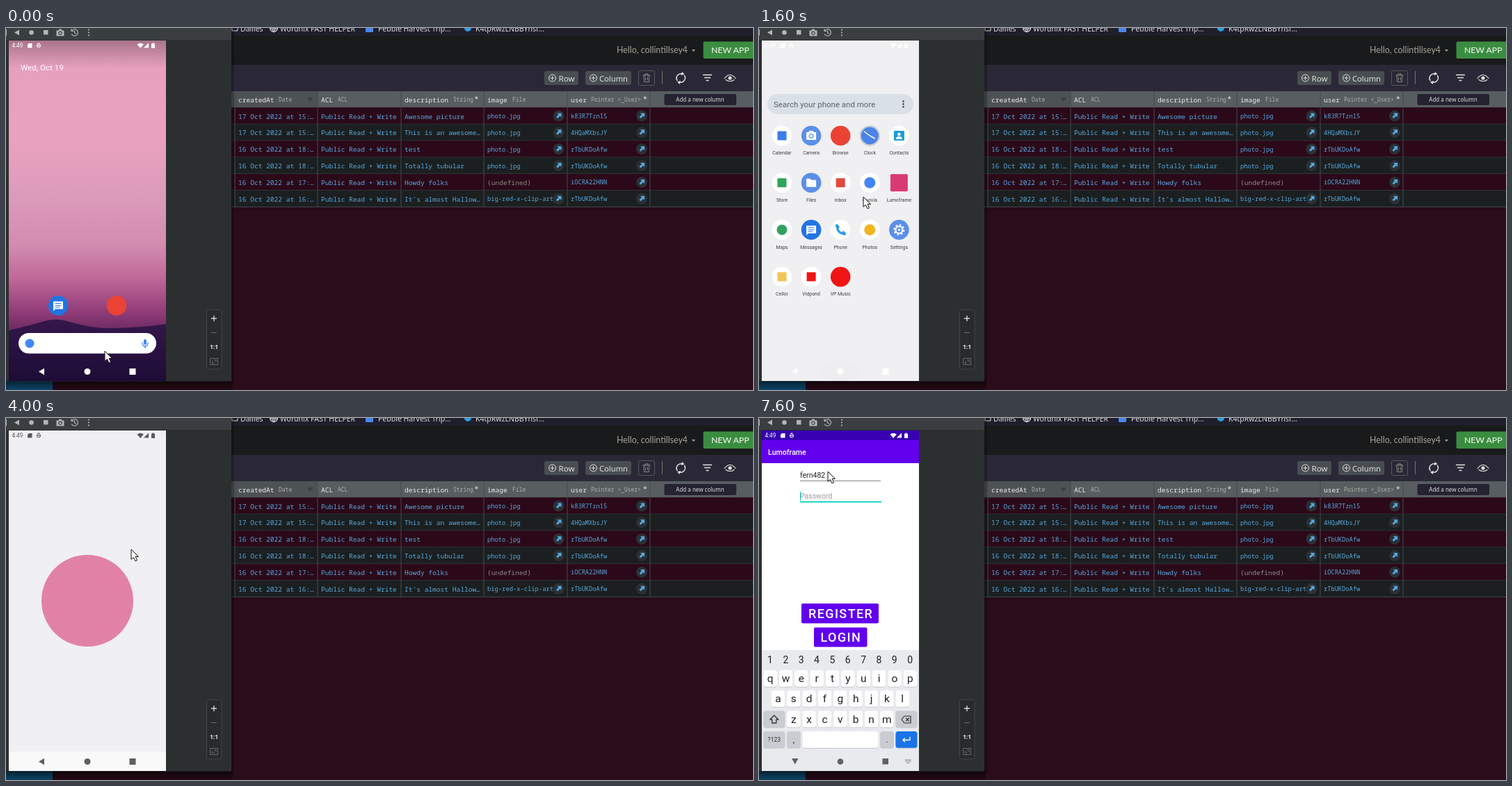
These frames come from a looping animation (1074x521 px, 8 s). An HTML page:

```html
<!DOCTYPE html>
<html lang="en">
<head>
<meta charset="utf-8">
<title>Phone emulator beside a data browser</title>
<style>
html, body { margin: 0; width: 100%; height: 100%; overflow: hidden; background: #2a0c1a; }
svg { display: block; width: 1074px; height: 521px; }
text { white-space: pre; }
.ui { font-family: "Noto Sans", "Open Sans", sans-serif; }
.lato { font-family: Lato, sans-serif; }
.mono { font-family: "Noto Sans Mono", "DejaVu Sans Mono", monospace; }
.rob { font-family: Roboto, "Noto Sans", sans-serif; }
.mid { text-anchor: middle; }
.med { font-weight: 500; }
.line { fill: none; stroke-linecap: round; stroke-linejoin: round; }
</style>
</head>
<body>
<svg id="stage" viewBox="0 0 1074 521" xmlns="http://www.w3.org/2000/svg"></svg>
<script>
const LOOP = 8000;

// ---- drawing helpers ----
const text = (x, y, s, size, fill, cls = 'rob', more = '') =>
  `<text x="${x}" y="${y}" font-size="${size}" fill="${fill}" class="${cls}" ${more}>${s}</text>`;
const box = (x, y, w, h, fill, r = 0, more = '') =>
  `<rect x="${x}" y="${y}" width="${w}" height="${h}" rx="${r}" fill="${fill}" ${more}/>`;
const dot = (x, y, r, fill, more = '') => `<circle cx="${x}" cy="${y}" r="${r}" fill="${fill}" ${more}/>`;
const shape = (d, fill, more = '') => `<path d="${d}" fill="${fill}" ${more}/>`;
const line = (d, stroke, w = 1) => `<path class="line" d="${d}" stroke="${stroke}" stroke-width="${w}"/>`;
const group = (id, body) => `<g id="${id}">${body}</g>`;
const at = (x, y, body) => `<g transform="translate(${x} ${y})">${body}</g>`;
const dots = (x, y, gap, r, fill, across) =>
  [-1, 0, 1].map(i => across ? dot(x + i * gap, y, r, fill) : dot(x, y + i * gap, r, fill)).join('');
const mic = (x, y, fill) => at(x, y,
  box(-2, -6, 4, 8, fill, 2) + line('M-4 -1Q-4 4 0 4T4 -1M0 4V6.5', fill, 1.3));
const gear = (x, y, r, stroke, w) => at(x, y,
  dot(0, 0, r, 'none', `stroke="${stroke}" stroke-width="${w}"`) +
  dot(0, 0, r + w, 'none', `stroke="${stroke}" stroke-width="${w}" stroke-dasharray="${(r + w) * Math.PI / 8}"`) +
  dot(0, 0, r * .35, stroke));

// ---- data browser ----
const BLUE = '#57a9de', PALE = '#e4e2df';
const cols = [329, 448, 568, 687, 807, 926];
const heads = [['createdAt', 'Date', 392], ['ACL', 'ACL', 477], ['description', 'String', 643],
  ['image', 'File', 728], ['user', 'Pointer &lt;_User&gt;', 841]];
const rows = [
  ['17 Oct 2022 at 15:…', 'Awesome picture', 'photo.jpg', 'k83R7Tzn15'],
  ['17 Oct 2022 at 15:…', 'This is an awesome…', 'photo.jpg', '4HQaMXbsJY'],
  ['16 Oct 2022 at 18:…', 'test', 'photo.jpg', 'rTbUKDoAfw'],
  ['16 Oct 2022 at 18:…', 'Totally tubular', 'photo.jpg', 'rTbUKDoAfw'],
  ['16 Oct 2022 at 17:…', 'Howdy folks', '', 'iOCRA22HNN'],
  ['16 Oct 2022 at 16:…', "It's almost Hallow…", 'big-red-x-clip-art', 'rTbUKDoAfw']];

const link = (x, y) => dot(x, y, 8, '#2b3036') + shape(`M${x - 2} ${y - 4}h6v6l-2-2l-3.5 3.5l-2-2l3.5-3.5z`, BLUE);
const plus = (x, y) => dot(x, y, 5, 'none', `stroke="${PALE}"`) + line(`M${x - 2.5} ${y}h5M${x} ${y - 2.5}v5`, PALE);

function browser() {
  let s = box(0, 0, 1074, 521, '#2a0c1a') + box(0, 0, 1074, 11, '#1f1e2b') + box(0, 11, 1074, 42, '#191a1b') +
    box(0, 53, 1074, 38, '#2a2836') + box(0, 508, 67, 13, '#0d5078');
  const mark = (x, label) => text(x, 4.8, label, 10.5, '#dcdbe0', 'ui');
  s += line('M325 -2V4H333V-2', '#dcdbe0') + mark(337, 'Dailies') +
    dot(385, 0, 5.5, 'none', 'stroke="#e6e6ea" stroke-width="1.2"') + line('M380 1h10M385 -5v11M383 -4q-2 5 1 9M387 -4q2 5 -1 9', '#e6e6ea', .9) +
    mark(394, 'Wordnix FAST HELPER') + box(517, -5, 11, 11, '#4a86f0', 1) + mark(535, 'Pebble Harvest Trip…') +
    dot(664, 0, 5, '#2a9fe8') + mark(675, 'K4tpRwzLNBBYhsf…');

  s += text(980, 36, 'Hello, collintillsey4', 12.4, '#a9a39a', 'lato', 'text-anchor="end"') + shape('M986 31h5l-2.5 3z', '#a9a39a') +
    box(1002.5, 19.5, 76, 24.5, '#3a8d40', 2) + text(1014, 36, 'NEW APP', 12.2, '#f0f3ee', 'lato med');

  s += box(774, 62, 49, 20, '#484d51', 3) + plus(785.5, 72) + text(794.5, 76.5, 'Row', 11.6, PALE, 'ui') +
    box(833, 62, 66, 20, '#484d51', 3) + plus(844.5, 72) + text(853, 76.5, 'Column', 11.2, PALE, 'ui') +
    box(909.5, 61.5, 23, 21, 'none', 2, 'stroke="#53585c"') +
    line('M916 68h10M919 68v-2h4v2M917 68l.6 9.5h6.8l.6-9.5M919.5 71v4M922.5 71v4', '#8b8986') + box(943, 62, 1, 19, '#77746f') +
    line('M965 75.5a6.3 6.3 0 0 1 8-9M975.5 68.500a6.3 6.3 0 0 1-8 9', PALE, 1.5) +
    shape('M972 63l3.5 3.5l-5 1.500zM968.5 81l-3.500-3.5l5-1.5z', PALE) +
    line('M1002.5 67.5h12M1004.5 71.5h8M1007 75.5h3', PALE, 1.4) +
    line('M1033 72.500q8-10 16 0M1035 74.500q6 4.500 12 0', PALE, 1.2) + dot(1041, 72, 2.6, PALE);

  s += box(324, 91, 750, 23.5, '#575d60') + box(324, 91, 124, 23.5, '#4d5255');
  heads.forEach(([name, type, x], i) => {
    s += text(cols[i] + 5, 106.5, name, 9.55, '#eeece8', 'mono') + text(x, 106, type, 8, '#b3b0aa', 'mono');
  });
  s += text(673, 106, '*', 11, '#eeece8', 'mono') + text(915.5, 106, '*', 11, '#eeece8', 'mono') + shape('M433 100h9l-4.5 6z', '#3b4043') +
    box(946.5, 95, 103.5, 16, '#252231', 2) + text(998, 106, 'Add a new column', 8, '#e0dedb', 'ui mid');

  rows.forEach(([date, about, file, user], i) => {
    const y = 114.5 + i * 23.85, mid = y + 12, base = y + 16;
    s += box(324, y, 750, 23.85, i % 2 ? '#1b1f20' : '#2b0919') + box(324, y + 23.3, 750, 1, '#40474a') +
      text(334, base, date, 9.55, BLUE, 'mono') + text(453, base, 'Public Read + Write', 9.55, BLUE, 'mono') +
      text(573, base, about, 9.55, BLUE, 'mono') +
      (file ? text(692, base - .5, file, 8.8, BLUE, 'mono') + link(794.5, mid) : text(692, base, '(undefined)', 9.55, '#8e8a84', 'mono')) +
      text(812, base - .5, user, 8.7, BLUE, 'mono') + link(914, mid);
  });
  return s + cols.map(x => box(x - .5, 91, 1, 167, '#454c4f')).join('');
}

// ---- emulator window ----
function frame() {
  const c = '#b3b6b8';
  return box(324, 0, 4, 510, '#000', 0, 'opacity=".25"') + box(0, 508, 326, 13, 'url(#shadow)') +
    box(0, 0, 324, 508.5, '#2c2f30') + box(0, 0, 324, 17, '#3a3e40') +
    box(0, 2, 1, 9, c) + shape('M12 6.5l7-4v8z', c) + dot(36.5, 6.5, 3.3, c) + box(54, 3, 6.5, 6.5, c) +
    shape('M72.5 3.5h3l1-2h3l1 2h3v8h-11z', c) + dot(78, 7.3, 2.2, 'none', 'stroke="#3a3e40" stroke-width="1.1"') +
    line('M94.5 4a4.8 4.8 0 1 1 0 5M94 1.5v3h3M98.5 4v3l2 1', c, 1.2) + dots(119, 6.5, 4, 1.1, c) +
    box(288.5, 405.5, 21.5, 85.5, '#282a2b', 3, 'stroke="#414446"') + line('M295.5 418h7M299 414.5v7', '#d5d7d8', 1.4) +
    line('M295.5 438.5h7', '#6c6f71') + text(299, 462, '1:1', 8.5, '#e3e4e5', 'ui mid', 'font-weight="700"') +
    line('M294 475.5h10.5v9h-10.5zM296.5 482v-2.5M296.5 482h2.5M302 478v2.5M302 478h-2.5', '#66696b');
}

// ---- launcher ----
const disc = (x, y, fill) => dot(x, y, 14.3, fill);
const bubble = shape('M-7 -6H7V5H-4L-7 8Z', '#fff') + line('M-4 -3H4M-4 0H4M-4 2.5H2', '#2a72e0', 1);
const badge = color => box(-6.5, -6.5, 13, 13, color, 1);
const BG = '#5b90e8';

const home = () =>
  text(21, 60.5, 'Wed, Oct 19', 11.6, '#fff') + disc(75, 399.5, '#2174e3') + at(75, 399.5, bubble) +
  disc(159, 399.5, '#ea4335') + box(18, 439, 198, 29.5, '#fff', 14.75) + dot(34, 454, 6.5, '#4285f4') + mic(200, 454, '#4285f4');

// label, disc colour, pictogram
const apps = [
  ['Calendar', '#fff', badge('#3b7de8')],
  ['Camera', BG, shape('M-7 -5h3l1.5-2h5l1.5 2h3v11h-14z', '#fff') + dot(0, .5, 3.5, BG) + dot(0, .5, 2.2, '#fff')],
  ['Browse', '#ea4335', ''],
  ['Clock', '#4b83e6', dot(0, 0, 13.5, 'none', 'stroke="#c9cdd3" stroke-width="2"') + line('M-8 -6L0 0L7 4', '#fff', 1.5)],
  ['Contacts', '#fff', box(-7.5, -7, 15, 14, '#1c9ad8', 1) + dot(0, -2, 2.3, '#fff') + shape('M-4.5 5q0-4 4.5-4t4.5 4z', '#fff')],
  ['Store', '#fff', badge('#2fa35a')],
  ['Files', BG, shape('M-7 -6h5l2 2h7v10h-14z', '#fff')],
  ['Inbox', '#fff', badge('#e14a3c')],
  ['Quovia', '#fff', dot(0, 0, 8, '#4285f4')],
  ['Lumoframe', '#fff', box(-12.5, -12.5, 25, 25, '#d83a72', 2)],
  ['Maps', '#fff', dot(0, 0, 7.5, '#34a060')],
  ['Messages', '#2174e3', bubble],
  ['Phone', '#fff', line('M-5 -6Q-5 5 6 6', '#2a9be6', 3) + line('M-5.5 -6l2 2M4 4l2 2', '#2a9be6', 4)],
  ['Photos', '#fff', dot(0, 0, 8, '#f2b51f')],
  ['Settings', BG, gear(0, 0, 5, '#fff', 2)],
  ['Cellor', '#fff', badge('#f1c35a')],
  ['Vidpond', '#fff', badge('#f01414')],
  ['VP Music', '#f01414', '']];

const drawer = () =>
  box(12, 45, 210, 29, '#dae1e6', 14.5) + text(21, 63.8, 'Search your phone and more', 11.5, '#59636b') + dots(207.5, 59.5, 4, 1.2, '#333') +
  apps.map(([label, fill, icon], i) => {
    const x = 33 + i % 5 * 42.1, y = 105 + Math.floor(i / 5) * 67.7;
    return disc(x, y, fill) + at(x, y, icon) + text(x, y + 27.3, label, 6.9, '#3c3f43', 'rob mid');
  }).join('');

// ---- login screen ----
const app = () =>
  box(4, 18, 226, 490, '#fff') + box(4, 18, 226, 14.5, '#3700b3') + box(4, 32, 226, 33, '#6200ee') + box(4, 480, 226, 28, '#000') +
  text(13, 52.7, 'Lumoframe', 10.6, '#fff', 'rob med') +
  text(59, 86, 'Username', 10.4, '#9b9b9b', 'rob', 'id="hint"') +
  `<text x="59" y="86" font-size="10.5" class="rob">${[...'fern482'].map((c, i) => `<tspan id="c${i}">${c}</tspan>`).join('')}</text>` +
  box(59, 90, 116, 1, '#868686') + group('focus1', box(59, 89.7, 116, 1.4, '#17d3c6')) +
  text(59, 116.3, 'Password', 10.5, '#9b9b9b') + box(59, 120, 117, 1, '#868686') +
  group('focus2', box(59, 119.7, 117, 2, '#17d3c6') + box(59, 105.5, 1, 13.5, '#17d3c6')) +
  box(61, 267, 111, 28.5, '#6200ee', 2) + text(71, 287.6, 'REGISTER', 18, '#fff', 'rob med', 'letter-spacing="1.4"') +
  box(79, 301.5, 76.5, 28, '#6200ee', 2) + text(88.5, 322.3, 'LOGIN', 18, '#fff', 'rob med', 'letter-spacing="1.4"');

const key = (x, y, w, fill = '#fff') => box(x - w / 2, y - 11.8, w, 24.6, '#c8cacf', 3.5) + box(x - w / 2, y - 12, w, 23.8, fill, 3.5);
const STEP = 22.35;
const letters = (chars, x, y) => [...chars].map((c, i) =>
  key(x + i * STEP, y, 19.6) + text(x + i * STEP, y + 5, c, 15.5, '#202124', 'rob mid')).join('');

function keyboard() {
  const ink = '#505357', gray = '#c9ccd3';
  const digits = [...'1234567890'];
  const tools = line('M19.5 345l-3 3l3 3', ink, 1.3) +
    line('M44 343.5h8.5v6l-3 3h-5.5zM46 348.5q2 2.5 4.5 0', ink, 1.2) + text(80, 351, 'GIF', 8, ink, 'rob mid', 'font-weight="700"') +
    line('M109 344h8v9h-8zM111.5 344v-1.5h3v1.5M111 347.5h4M111 350h4', ink, 1.2) + gear(145.5, 348, 2.9, ink, 1.5) +
    box(166, 342, 1, 12, '#d3d6da') + dots(186, 348, 3.8, 1, ink, true);
  const words = line('M17.5 345l3 3l-3 3', ink, 1.3) +
    ['ferns', 'fern', 'fernery'].map((w, i) => text(62 + i * 53, 351.5, w, 9.5, ink, 'rob mid')).join('') +
    box(88, 342, 1, 12, '#d3d6da') + box(140, 342, 1, 12, '#d3d6da');
  return box(4, 334, 226, 176, '#e8eaee') +
    group('bar', dot(18.5, 348, 8, '#fff') + mic(218, 348, ink) + group('tools', tools) + group('words', words)) +
    group('nums', digits.map((d, i) => text(16 + i * STEP, 353.3, d, 14, '#202124', 'rob mid')).join('')) +
    letters('qwertyuiop', 16.2, 375) + letters('asdfghjkl', 27.4, 404) + letters('zxcvbnm', 49.8, 433.5) +
    group('sups', digits.map((d, i) => text(22.7 + i * STEP, 369.5, d, 5, ink, 'rob mid')).join('')) +
    key(21.8, 433.5, 31, gray) + line('M21.8 428l-6 6h3v5h6v-5h3z', '#333', 1.3) +
    key(212, 433.5, 31, gray) + line('M205 434l4-5h9v10h-9zM211.5 432l4 4M215.5 432l-4 4', '#333', 1.2) +
    key(21.8, 463, 31, gray) + text(21.8, 466, '?123', 8.5, '#333', 'rob mid') +
    key(50, 463, 19.6, gray) + text(50, 467, ',', 13, '#333', 'rob mid') +
    key(72, 463, 19.6) + dot(72, 463, 5.5, 'none', 'stroke="#333" stroke-width="1.2"') + dot(70, 461.5, .9, '#333') + dot(74, 461.5, .9, '#333') +
    line('M69 464.5q3 3.5 6 0', '#333', 1.1) + key(128, 463, 87) +
    group('wide', box(61, 450, 23, 26, '#e8eaee') + key(117, 463, 109)) +
    key(184, 463, 19.6, gray) + text(184, 467, '.', 13, '#333', 'rob mid') +
    key(212, 463, 31, '#1a73e8') + line('M217 459.5v4h-10M209.5 461l-2.5 2.5l2.5 2.5', '#fff', 1.4) +
    shape('M47 490h9.5l-4.7 8.5z', '#606266') + dot(117, 494.5, 4.3, '#606266') + box(177.5, 490, 8.5, 8.5, '#606266') +
    line('M210.5 492h8M210.5 494h8M212.5 496.5h4', '#85878b', .9);
}

// ---- system bars ----
const status = () => text(8.5, 28, '4:49', 8.2, 'currentColor') +
  shape('M33 22h4.5v6.5h-6.5v-4.5z', 'currentColor') + dot(47, 25.5, 2.6, 'none', 'stroke="currentColor"') +
  box(44.5, 25, 5, 1, 'currentColor') + box(45.5, 21.5, 3, 1, 'currentColor') +
  shape('M188.5 23.5q4.7-3.5 9.4 0l-4.7 5.5z', 'currentColor') + shape('M205 21.5v7h-7z', 'currentColor') +
  shape('M209 22.5h1.5v-1h2v1h1.5v6.5h-5z', 'currentColor');
const nav = () => shape('M47 494.5l8-4.7v9.4z', 'currentColor') + dot(117, 494.5, 4.5, 'currentColor') + box(177.5, 490, 9, 9, 'currentColor');

const phone = () =>
  box(4, 18, 226, 490, 'url(#sky)') + box(4, 18, 226, 40, 'url(#scrim)') +
  shape('M4 435Q36 428 58 421Q75 417 92 423Q115 430 140 432Q190 432 230 426V508H4Z', 'url(#hill)') +
  group('home', home()) + group('paper', box(4, 18, 226, 490, '#f0eff1')) +
  group('band', box(4, 480, 226, 28, '#f9f9fa')) + group('ripple', '<ellipse cx="117" cy="494" rx="32" ry="15" fill="#eeedef"/>') +
  group('drawer', drawer()) + group('splash', dot(117, 263, 66, '#d83a72')) + group('app', app()) +
  group('status', status()) + group('nav', nav()) + group('keys', keyboard());

const gradient = (id, stops) => `<linearGradient id="${id}" x2="0" y2="1">` +
  stops.map(([o, c]) => `<stop offset="${o}" stop-color="${c}"/>`).join('') + '</linearGradient>';

document.getElementById('stage').innerHTML = '<defs>' +
  gradient('sky', [[0, '#e79fbe'], [.3, '#e8a2bf'], [.46, '#dc9aba'], [.6, '#d28cb0'], [.7, '#bf6797'], [.8, '#8f3b77'], [.87, '#5f2459'], [1, '#35154a']]) +
  gradient('scrim', [[0, '#0004'], [1, '#0000']]) + gradient('shadow', [[0, '#0009'], [1, '#0002']]) +
  gradient('hill', [[0, '#35174b'], [1, '#1d0c36']]) +
  '<clipPath id="screen"><rect x="4" y="18" width="226" height="490"/></clipPath></defs>' +
  browser() + frame() + `<g clip-path="url(#screen)">${phone()}</g>` +
  group('cursor', shape('M0 0V14.5L3.5 11.5L6 17L8.5 15.8L6.2 10.5H10.5Z', '#fff', 'stroke="#111" stroke-linejoin="round"'));

// ---- motion: keys in ms, moving in 100 ms ticks ----
const sheet = [];
function track(id, keys, hard) {
  const times = Object.keys(keys).map(Number);
  const frames = times.map((ms, i) => {
    const ticks = ((times[i + 1] ?? LOOP) - ms) / 100;
    const ease = hard ? 'step-end' : `steps(${ticks})`;
    return `${ms / LOOP * 100}%{${keys[ms]};animation-timing-function:${ease}}`;
  });
  frames.push(`100%{${keys[times.at(-1)]}}`);
  sheet.push(`@keyframes ${id}{${frames.join('')}}#${id}{animation:${id} ${LOOP}ms infinite}`);
}
const fade = (o, y = 0) => `opacity:${o};transform:translateY(${y}px)`;
const go = (x, y) => `transform:translate(${x}px,${y}px)`;
const tint = c => `color:${c}`;
const show = (id, from, to = LOOP) => {
  const keys = { 0: `opacity:${from ? 0 : 1}` };
  if (from) keys[from] = 'opacity:1';
  if (to < LOOP) keys[to] = 'opacity:0';
  track(id, keys, true);
};

track('home', { 0: fade(1), 100: fade(1), 500: fade(0, -70) });
track('paper', { 0: fade(0), 100: fade(0), 600: fade(1) });
track('drawer', { 0: fade(0, 300), 100: fade(0, 300), 600: fade(0, 110), 700: fade(.07, 92.5), 1300: fade(1, 64),
  1600: fade(1, 50), 1800: fade(1, 32), 2100: fade(1, 8), 2400: fade(1), 3500: fade(1), 3600: fade(.55), 3700: fade(0) });
track('splash', { 0: fade(0), 3700: fade(.3), 4000: fade(.6), 4300: fade(1), 4700: fade(0) }, true);
track('keys', { 0: fade(0, 174), 5100: fade(0, 174), 5200: fade(1, 130), 5500: fade(1) });
track('status', { 0: tint('#fff'), 300: tint('#5a5a5c'), 1300: tint('#fff'), 1800: tint('#5a5a5c'), 4700: tint('#1c0a66'), 5000: tint('#fff') }, true);
track('nav', { 0: tint('#fff'), 400: tint('#5f5f61'), 1400: tint('#fff'), 2100: tint('#5f5f61') }, true);
track('cursor', { 0: go(142, 465), 100: go(142, 465), 700: go(155, 209), 1000: go(157, 195), 1600: go(150, 243), 1900: go(152, 238),
  2400: go(182, 188), 2900: go(182, 188), 3000: go(180, 190), 3100: go(196, 163), 3200: go(203, 177), 3300: go(203, 177),
  3400: go(200, 180), 3600: go(200, 180), 3700: go(180, 189), 4600: go(180, 189), 4700: go(115.5, 98), 4900: go(115.5, 98),
  5000: go(112, 93), 5200: go(108, 88), 5400: go(99, 77) });
show('band', 1800);
show('ripple', 1500, 1800);
show('app', 4700);
show('hint', 0, 6200);
show('focus1', 5300, 7600);
show('focus2', 7600);
show('tools', 0, 6200);
show('words', 6200, 7600);
show('bar', 0, 7600);
show('sups', 0, 7600);
show('nums', 7600);
show('wide', 7600);
[6200, 6300, 6400, 6500, 7100, 7200, 7400].forEach((ms, i) =>
  track('c' + i, { 0: 'fill:transparent', [ms]: 'fill:#222' }, true));

const style = document.createElement('style');
style.textContent = sheet.join('\n');
document.head.append(style);
</script>
</body>
</html>
```
